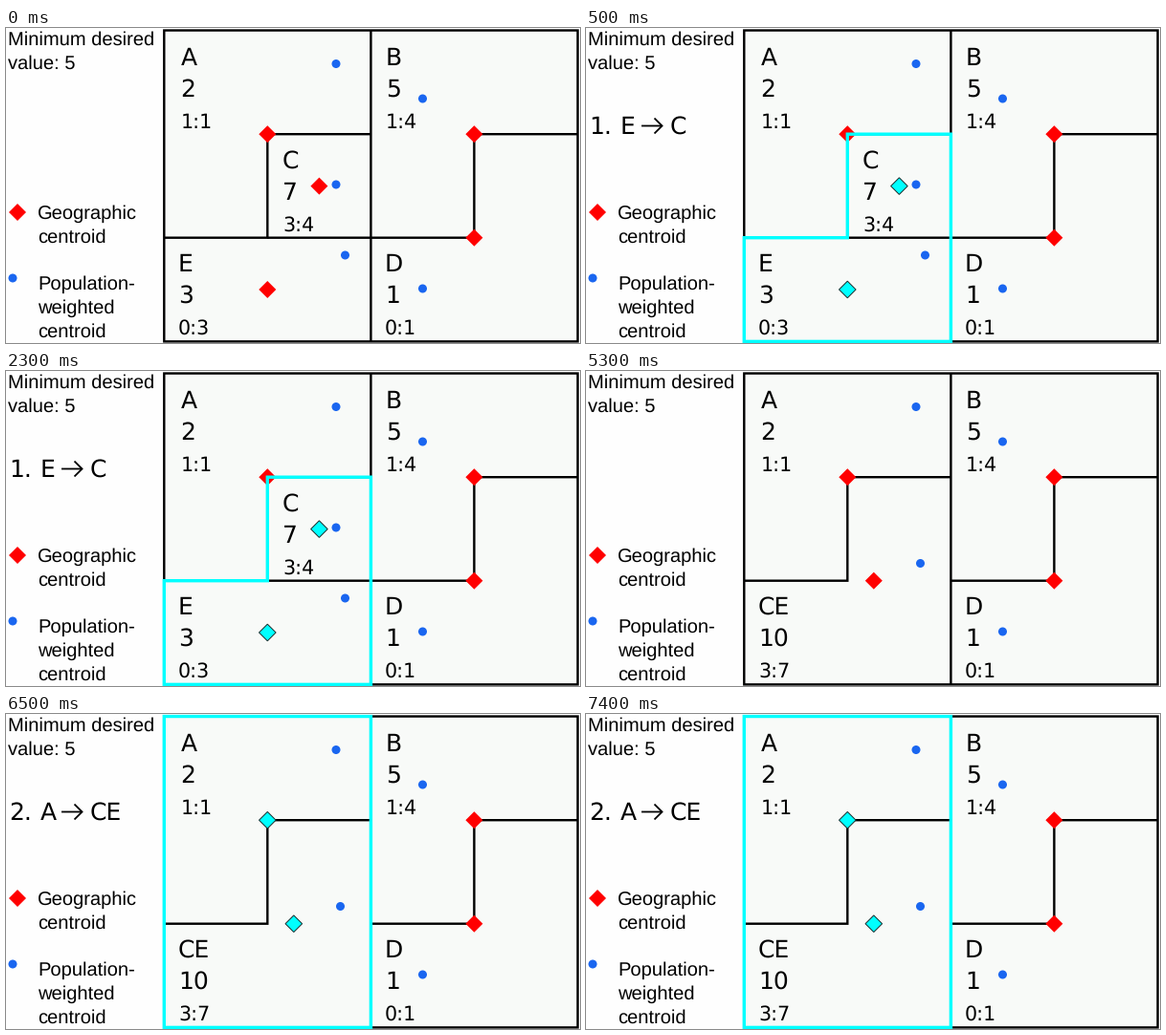
These frames come from a looping animation (600x330 px, 8000 ms). A matplotlib script:

```python
import matplotlib.pyplot as plt
from matplotlib.animation import FuncAnimation
from matplotlib.patches import Circle, Polygon, Rectangle

W, H, DPI = 600, 330, 100
STEP, LOOP = 500, 8000
PT = 72 / DPI  # points per pixel

RED, CYAN, BLUE = "#ff0000", "#00ffff", "#1a66f0"
PAPER, MAP = "#fefefe", "#f8faf8"
LABEL, SMALL, SANS = 25, 20.6, 20.2

# Grid of the map
X0, X1, X2, X3, X4 = 165.3, 273.3, 381.4, 489.4, 597.6
Y0, Y1, Y2, Y3 = 2.5, 111.2, 219.7, 328.4

plt.rcParams["text.hinting"] = "none"
fig = plt.figure(figsize=(W / DPI, H / DPI), dpi=DPI, facecolor=PAPER)
ax = fig.add_axes([0, 0, 1, 1])


def text(x, y, s, size=LABEL, font="DejaVu Sans"):
    ax.text(x, y, s, fontsize=size * PT, family=font, color="black",
            ha="left", va="baseline", zorder=6)


def line(points, width=2.4):
    xs, ys = zip(*points)
    ax.plot(xs, ys, color="black", lw=width * PT, zorder=2, snap=False,
            solid_capstyle="butt", solid_joinstyle="miter")


def outline(points):
    ax.add_patch(Polygon(points, fill=False, ec=CYAN, lw=3.4 * PT,
                         joinstyle="miter", snap=False, zorder=4))


def diamond(x, y, active=False):
    r = 8.8 if active else 9
    corners = [(x, y - r), (x + r, y), (x, y + r), (x - r, y)]
    ax.add_patch(Polygon(corners, fc=CYAN if active else RED,
                         ec="#203030" if active else "none",
                         lw=PT if active else 0, zorder=5 if active else 3))


def dot(x, y):
    ax.add_patch(Circle((x, y), 4.5, fc=BLUE, ec="none", zorder=5))


def region(x, y, name, value, share):
    text(x, y, name)
    text(x, y + 33, value)
    text(x, y + 66, share, SMALL)


def legend():
    for x, y, s in ((2, 18, "Minimum desired"), (2, 43, "value: 5"),
                    (33, 200, "Geographic"), (33, 225, "centroid"),
                    (33, 274, "Population-"), (33, 299, "weighted"),
                    (33, 324, "centroid")):
        text(x, y, s, SANS, "Liberation Sans")
    diamond(12, 193)
    dot(7, 262)


def step_title(number, a, b):
    text(3, 111, number + ".")
    text(36, 111, a)
    line([(58, 102.5), (79.5, 102.5)], width=1.8)
    line([(71.5, 94.5), (79.5, 102.5), (71.5, 110.5)], width=1.8)
    text(88, 111, b)


def base_map(merged, a_active):
    ax.add_patch(Rectangle((X0, Y0), X4 - X0, Y3 - Y0, fc=MAP, ec="black",
                           lw=2.4 * PT, joinstyle="miter", snap=False,
                           zorder=1))
    line([(X2, Y0), (X2, Y3)])
    line([(X0, Y2), (X1, Y2), (X1, Y1), (X2, Y1)])
    line([(X2, Y2), (X3, Y2), (X3, Y1), (X4, Y1)])
    if not merged:
        line([(X1, Y2), (X2, Y2)])

    region(182.5, 39, "A", "2", "1:1")
    region(397, 39, "B", "5", "1:4")
    region(396, 255, "D", "1", "0:1")
    diamond(X1, Y1, a_active)
    diamond(X3, Y1)
    diamond(X3, Y2)
    for spot in ((345, 37.5), (435.5, 74), (435.5, 273)):
        dot(*spot)


def separate(active):
    region(289, 147, "C", "7", "3:4")
    region(180, 255, "E", "3", "0:3")
    diamond(327.4, 165.6, active)
    diamond(X1, 274, active)
    dot(345, 164)
    dot(354.5, 238)


def joined(active):
    region(180, 255, "CE", "10", "3:7")
    diamond(300.8, Y2, active)
    dot(349.5, 201.5)


def draw(i):
    t = i * STEP
    merged = t >= 3500
    first, second = 500 <= t < 3500, t >= 6500

    ax.clear()
    ax.set_xlim(0, W)
    ax.set_ylim(H, 0)
    ax.axis("off")

    legend()
    base_map(merged, second)
    if merged:
        joined(second)
    else:
        separate(first)

    if first:
        step_title("1", "E", "C")
        outline([(X0, Y2), (X1, Y2), (X1, Y1), (X2, Y1), (X2, Y3), (X0, Y3)])
    elif second:
        step_title("2", "A", "CE")
        outline([(X0, Y0), (X2, Y0), (X2, Y3), (X0, Y3)])
    return []


anim = FuncAnimation(fig, draw, frames=LOOP // STEP, interval=STEP,
                     init_func=lambda: [], repeat=True, repeat_delay=0)
plt.show()
```
